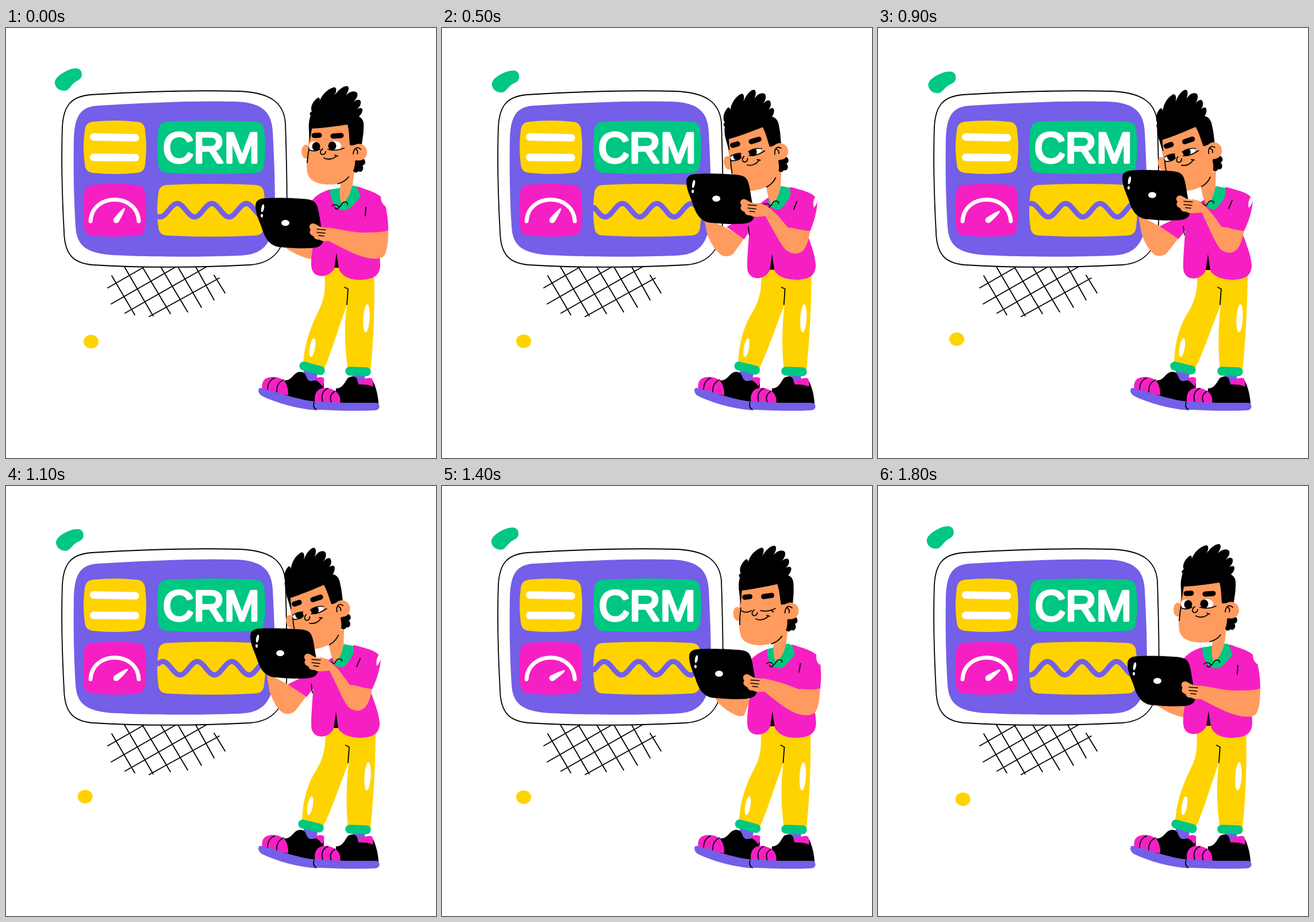
Animation of 748x748 px, one loop 1900 ms. Source, as an HTML page with a canvas:

```html
<!DOCTYPE html>
<html lang="en">
<head>
<meta charset="utf-8">
<title>CRM dashboard</title>
<style>
  html, body { margin: 0; width: 100%; height: 100%; overflow: hidden; background: #fff; }
  canvas { display: block; }
</style>
</head>
<body>
<canvas id="stage" width="748" height="748"></canvas>
<script>
const ctx = document.getElementById('stage').getContext('2d');
const LOOP = 1900, STEP = 100;
const PURPLE = '#735fe8', GREEN = '#00c781', YELLOW = '#ffd300', PINK = '#f61fc3',
      SKIN = '#ff9b5e', BLACK = '#000', WHITE = '#fff';

const lerp = (a, b, k) => a + (b - a) * k;
const clamp = x => Math.min(1, Math.max(0, x));
const wave = (t, peak) => Math.cos((t - peak) / LOOP * 2 * Math.PI);
const smooth = (t, from, to) => {
  const x = clamp((t - from) / (to - from));
  return x * x * x * (x * (6 * x - 15) + 10);
};

function track(keys, t) {
  const i = Math.max(1, keys.findIndex(key => key[0] >= t));
  const [t0, a] = keys[i - 1], [t1, b] = keys[i];
  return lerp(a, b, (t - t0) / (t1 - t0));
}

// Blends two paths that have the same commands.
function morph(a, b, k) {
  const ends = b.match(/[\d.]+/g);
  let i = 0;
  return a.replace(/[\d.]+/g, n => lerp(+n, +ends[i++], k).toFixed(2));
}

function fill(color, path) {
  ctx.fillStyle = color;
  ctx.fill(new Path2D(path));
}

function line(path, width = 1.8, color = BLACK) {
  ctx.strokeStyle = color;
  ctx.lineWidth = width;
  ctx.stroke(new Path2D(path));
}

function oval(color, x, y, rx, ry, angle = 0) {
  ctx.fillStyle = color;
  ctx.beginPath();
  ctx.ellipse(x, y, rx, ry, angle, 0, 2 * Math.PI);
  ctx.fill();
}

function group(x, y, angle, draw) {
  ctx.save();
  ctx.translate(x, y);
  ctx.rotate(angle);
  draw();
  ctx.restore();
}

function tile(color, x0, y0, x1, y1) {
  const r = 17, cx = (x0 + x1) / 2, cy = (y0 + y1) / 2;
  fill(color, `M${x0 + r} ${y0 + 2} Q${cx} ${y0 - 2} ${x1 - r} ${y0 + 2}
    Q${x1 - 3} ${y0 + 3} ${x1 - 2} ${y0 + r} Q${x1 + 2} ${cy} ${x1 - 2} ${y1 - r}
    Q${x1 - 3} ${y1 - 3} ${x1 - r} ${y1 - 2} Q${cx} ${y1 + 2} ${x0 + r} ${y1 - 2}
    Q${x0 + 3} ${y1 - 3} ${x0 + 2} ${y1 - r} Q${x0 - 2} ${cy} ${x0 + 2} ${y0 + r}
    Q${x0 + 3} ${y0 + 3} ${x0 + r} ${y0 + 2}Z`);
}

function drawDecor(t) {
  const s = (1 + wave(t, 850)) / 2;
  group(108 + 3 * s, 90 + 5 * s, 0.07 * s, () => {
    ctx.translate(-108, -90);
    fill(GREEN, 'M85 97C83 88 95 79 108 73C118 69 128 68 131 76C133 84 131 88 123 92C115 96 113 103 106 108C98 111 87 107 85 97Z');
  });
  oval(YELLOW, 142.5 + 5.5 * wave(t, 0), 543.3 + 3 * wave(t, 200), 13, 11.8);

  line('M184 431L224 499M204 412L256 501M235 412L286 497M267 412L316 494M297 412L340 486M328 412L362 473M362 430L381 461');
  line('M177 452L245 413M183 480L300 413M207 496L353 413M249 502L371 435');
}

function drawPanel(t) {
  const outline = 'M98 172C100 135 113 119 148 116C230 111 330 108 405 110C460 112 483 130 486 165C488 230 490 290 488 340C485 385 465 409 425 412C330 417 230 417 150 412C118 409 102 395 101 355C98 300 96 230 98 172Z';
  fill(WHITE, outline);
  line(outline);
  fill(PURPLE, 'M118 195C119 155 128 137 160 135C250 130 330 126 400 128C445 130 462 145 464 180C467 240 469 290 467 330C463 378 445 395 405 396C330 399 250 398 185 395C140 391 123 380 121 345C118 300 117 245 118 195Z');
  tile(YELLOW, 135, 161, 244, 254);
  tile(GREEN, 263, 161, 451, 254);
  tile(PINK, 134, 271, 244, 363);
  tile(YELLOW, 263, 271, 451, 363);
  line('M152.5 189.5L225 191M152.5 225L225 225.5', 13, WHITE);

  line('M147 336C150 286 228 286 231 336', 7, WHITE);
  const degrees = track([[0, 55], [300, 70], [700, 38], [1300, 38], [1600, 17], [1800, 35], [1900, 55]], t);
  group(192, 334, -degrees * Math.PI / 180, () => {
    oval(WHITE, 0, 0, 5.5, 5.2);
    ctx.beginPath();
    ctx.moveTo(0, -5.2);
    ctx.quadraticCurveTo(15, -4, 24, -1.5);
    ctx.quadraticCurveTo(26, 0, 24, 1.5);
    ctx.quadraticCurveTo(15, 4, 0, 5.2);
    ctx.fill();
  });

  // The curve travels one full period per loop.
  const period = 60, peak = 298 + period * t / LOOP;
  ctx.beginPath();
  for (let x = 265; x <= 452; x += 2)
    ctx.lineTo(x, 317 - 11.7 * Math.cos((x - peak) / period * 2 * Math.PI));
  ctx.strokeStyle = PURPLE;
  ctx.lineWidth = 9;
  ctx.stroke();

  const pulse = Math.sin(Math.PI * clamp((t - 400) / 600)) ** 2;
  ctx.save();
  ctx.translate(357, 208.5);
  ctx.scale(1 + 0.045 * pulse, 1 + 0.045 * pulse);
  ctx.font = '74px "Liberation Sans", Arial, sans-serif';
  ctx.textAlign = 'center';
  ctx.fillStyle = ctx.strokeStyle = WHITE;
  ctx.lineWidth = 4.5;
  ctx.fillText('CRM', 0, 25.5);
  ctx.strokeText('CRM', 0, 25.5);
  ctx.restore();
}

function drawShoes() {
  fill(PURPLE, 'M519 594L542 600L540 616L514 610ZM603 600L624 600L625 618L603 618Z');

  fill(BLACK, 'M484 613C498 614 500 598 512 598C526 599 519 613 531 614C541 614 548 609 552 610C555 625 550 645 542 654L482 638Z');
  fill(PINK, 'M536 611C541 607 549 606 553 609C554 615 553 619 550 623C546 617 542 614 536 611Z');
  fill(PINK, 'M446 630C443 613 451 607 465 607C482 608 491 616 491 639Z');
  line('M467 609C459 612 455 619 455 630M483 612C474 616 470 624 471 635');
  fill(PURPLE, 'M443 626C470 632 505 647 540 650L538 665C505 662 470 652 445 640C437 635 438 625 443 626Z');

  fill(BLACK, 'M574 627C588 627 590 612 596 608C605 604 612 607 612 617C623 621 630 610 636 611C642 618 648 640 648 654L572 654Z');
  fill(PINK, 'M613 613C622 612 630 606 637 610C639 616 639 620 638 624C630 619 622 621 613 620Z');
  fill(PINK, 'M538 653C534 635 543 625 557 626C574 628 584 638 581 654Z');
  line('M560 627C550 631 548 640 551 651M572 632C564 637 563 643 566 652');
  fill(PURPLE, 'M538 649C575 653 610 652 645 652C652 655 651 664 643 665C605 667 570 665 539 664C534 661 534 651 538 649Z');
  line('M536 651C534 656 535 661 540 664');
}

function drawLegs(k) {
  drawShoes();
  fill(YELLOW, morph(
    'M553 410L640 425C642 470 640 540 634 596L595 596C589 555 588 520 593 482C580 515 568 560 553 594L517 586C518 555 528 525 540 500C555 470 557 460 553 410Z',
    'M554 410L643 425C643 470 640 540 634 596L595 596C591 555 592 520 596 482C582 515 568 560 551 594L515 586C515 555 522 525 536 500C559 466 556 440 554 410Z', k));
  line(morph('M589 451L595 454L593 481', 'M591 451L597 454L595 481', k));
  oval(WHITE, 627 + 2 * k, 505, 5.5, 24.5, 0.06);
  oval(WHITE, 533 - 4 * k, 556, 4.6, 16.5, 0.17);
  line(morph('M518 588L547 596', 'M516 588L545 595', k), 15.5, GREEN);
  line('M598 597L627 598', 15.5, GREEN);
}

function drawTorso(k) {
  fill(BLACK, morph('M575 388L567 417L582 417Z', 'M574 390L567 421L581 421Z', k));
  fill(SKIN, morph(
    'M470 360L486 382C500 392 512 397 522 400C528 402 533 403 534 400L540 375L510 360Z',
    'M453 325L458 356C464 375 472 388 482 395C490 398 498 396 503 391L524 364L488 344Z', k));
  fill(PINK, morph(
    'M530 305C520 330 525 350 530 355L545 370L548 330Z',
    'M540 310C525 332 510 334 490 345L523 367L540 345Z', k));
  fill(PINK, morph(
    'M563 281C540 288 533 298 529 306L545 345L535 375C530 400 530 415 533 422C538 434 560 436 571 419L575 391L579 419C585 434 602 439 618 438C640 437 651 430 651 412C651 390 645 370 632 340L640 300C635 285 625 280 613 276Z',
    'M580 290C565 300 550 310 540 320L530 335L535 345C531 400 530 415 532 424C538 441 562 439 570 422L574 393L578 422C585 434 602 438 618 438C640 437 650 430 650 412C648 390 638 370 630 345L640 300C632 285 620 280 606 277Z', k));
  line(morph('M545 350L545 365', 'M531 345L533 360', k), 1.6);
  fill(GREEN, morph(
    'M564 281C563 290 568 304 574 311C582 318 590 319 596 315C608 306 618 292 624 281L606 274Z',
    'M572 292C566 300 568 306 572 310C578 316 584 317 588 314C598 306 606 290 608 279L588 275Z', k));
  fill(SKIN, morph(
    'M578 258L606 250L603 272C599 290 592 301 584 306C580 298 580 285 582 270Z',
    'M556 265L588 248L587 277C584 292 579 302 573 307C567 302 564 290 562 278Z', k));
  group(-10 * k, -2 * k, 0, () =>
    line('M567 310C569 306 577 307 579 311C578 316 572 316 572 312M579 312C584 310 583 305 587 303C592 302 595 304 594 307', 1.6));
}

function drawEyes(k) {
  if (k > 0.2 && k < 0.8) {
    line('M529 210Q537 216 546 211M562 212Q574 216 588 210M580 212L584 216');
    return;
  }
  oval(WHITE, 535, 206, 8, 8.5);
  oval(WHITE, 572, 205, 11, 8.5);
  oval(BLACK, 539.5, 206 + k, 7, 7.5);
  oval(BLACK, 567.5, 205 + k, 7, 7.5);
  if (k > 0.5) {
    fill(SKIN, 'M526 194L548 194L548 204Q538 201 527 206ZM559 194L585 194L585 203Q571 199 559 204Z');
    line('M528 205Q538 201 547 204M560 204Q571 199 584 204', 1.5);
  }
  line('M527 212Q537 216 546 211M560 211Q573 215 588 209');
}

function drawHead(k) {
  group(615 - 30 * k, 215 - 3 * k + 10 * k * (1 - k), -0.262 * k, () => {
    ctx.translate(-615, -215);
    fill(BLACK, 'M602 230L623 228C627 234 624 239 620 239C624 246 618 253 613 249C610 254 602 251 602 244Z');
    oval(SKIN, 521.5, 215, 7.5, 12);
    fill(SKIN, 'M529 165L598 160L608 200L607 235C606 252 595 266 580 270C562 274 545 273 533 265C523 258 523 246 523 236C524 215 527 195 529 165Z');
    fill(BLACK, 'M527 178C526 165 528 158 530 152C527 150 529 146 532 145C529 140 532 128 543 121C547 121 546 127 545 129C548 118 558 106 571 103C577 104 574 113 571 118C576 110 586 100 594 101C599 104 594 113 591 117C598 110 606 108 611 113C613 119 608 125 604 129C610 124 616 123 617 128C618 134 614 138 611 141C616 138 621 139 620 144C619 149 616 152 614 154C622 158 623 166 622 175C622 185 620 193 619 202L604 208L598 203C597 190 597 178 594 168C575 171 550 174 532 175L528 200Z');
    oval(SKIN, 614, 216, 14, 14.5);
    fill(SKIN, 'M594 205L612 203L610 230L596 235Z');
    line('M604 219C605 209 611 205 617 211M609 211Q613 214 611 219');
    line('M528 205Q525 219 524 234');
    line('M577 271Q589 268 596 259');
    line('M536 187L545 186.5M569 188L583 187', 9);
    drawEyes(k);
    line('M551 210C545 214 546 221 552 220C555 219 556 217 556 215');
    line('M553 226C560 230 570 228 575 222M572 221L577 223');
  });
}

function drawTabletAndArm(k) {
  const x = -9 * (1 - (1 - k) ** 2), y = -48.5 * k;
  group(x, y, 0, () => {
    fill(BLACK, 'M434 310C434 300 440 296 455 296C480 295 505 296 525 298C538 300 541 305 544 320L551 362C554 377 547 383 525 383C505 384 490 382 475 381C455 378 449 360 444 345C438 330 434 320 434 310Z');
    oval(WHITE, 486, 339, 7, 5.2);
    oval(WHITE, 446.5, 313.5, 2.4, 7, 0.2);
    oval(WHITE, 445, 326.5, 2, 3);
  });
  fill(SKIN, morph(
    'M560 347C585 351 605 356 628 356L665 350C665 370 664 385 658 396C650 405 630 401 615 396C595 389 575 377 560 370Z',
    'M546 297C562 302 570 306 598 346L638 348C634 365 632 375 626 383C618 394 604 393 594 383C584 368 575 345 563 321Z', k));
  fill(PINK, morph(
    'M610 276C640 284 655 291 659 304C664 325 665 340 665 352C652 356 640 356 626 355L620 300Z',
    'M604 277C632 283 650 288 652 302C650 322 644 338 637 353C622 352 608 347 596 343L605 290Z', k));
  line(morph('M626 312L625 327', 'M616 300L610 314', k));
  fill(WHITE, morph(
    'M652 292C660 294 664 302 661 311C654 306 652 300 652 292Z',
    'M651 291C655 298 650 308 645 313C643 305 645 297 651 291Z', k));
  group(x, y, 0, () => {
    fill(SKIN, 'M533 340C538 339 543 345 548 346C556 348 565 348 570 350L573 369C560 371 550 372 545 368C540 369 536 366 535 362C528 360 527 354 530 351C526 346 528 341 533 340Z');
    line('M541 350L556 351M541 355.5L555 357M544 361L553 362', 1.6);
  });
}

function draw(now) {
  const t = Math.floor(now % LOOP / STEP) * STEP;
  const lean = smooth(t, 100, 650) - smooth(t, 1050, 1600);
  ctx.fillStyle = WHITE;
  ctx.fillRect(0, 0, 748, 748);
  ctx.lineCap = ctx.lineJoin = 'round';
  drawDecor(t);
  drawPanel(t);
  drawLegs(lean);
  drawTorso(lean);
  drawHead(lean);
  drawTabletAndArm(lean);
  requestAnimationFrame(draw);
}
requestAnimationFrame(draw);
</script>
</body>
</html>
```
